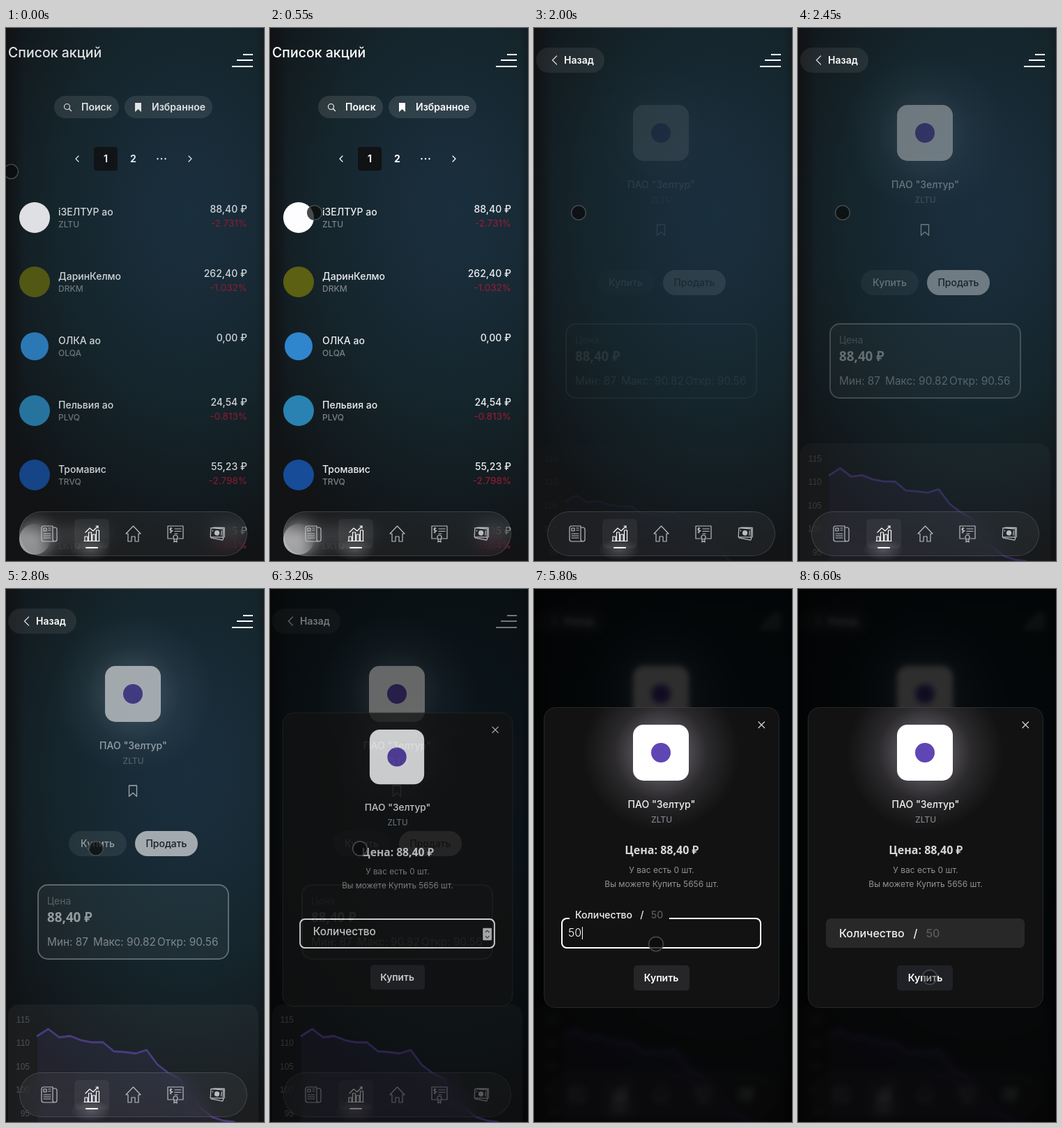
Recreate the animation shown at these times as an HTML page. Size 370 by 762 pixels, loop 8 s.

```html
<!DOCTYPE html>
<html lang="ru">
<head>
<meta charset="utf-8">
<title>Акции</title>
<style>
html, body { margin: 0; width: 100%; height: 100%; overflow: hidden; background: #0f1113; }
#stage { position: relative; width: 370px; height: 762px; overflow: hidden; }
#page, #page > *, #stage > svg, #shade { position: absolute; left: 0; top: 0; width: 370px; height: 762px; }
#page { background:
  linear-gradient(90deg, #101214 0, #10121400 7%, #10121400 97%, #10121455 100%),
  radial-gradient(ellipse 345px 500px at 262px 262px, #1a2f3e 0, #182b37 25%, #15252c 55%, #121b1f 82%, #111315 100%); }
#page #nav { left: 19px; top: 691px; width: 325px; height: 62px; border: 1px solid #ffffff22; border-radius: 32px;
  background: #ffffff0d; backdrop-filter: blur(13px); }
#shade { background: #000; }
text { white-space: pre; }
.line { fill: none; stroke-linecap: round; stroke-linejoin: round; }
</style>
</head>
<body>
<div id="stage">
  <div id="page">
    <svg id="back"></svg>
    <div id="nav"></div>
    <svg id="icons"></svg>
  </div>
  <div id="shade"></div>
  <svg id="front"></svg>
</div>
<script>
const $ = id => document.getElementById(id);
const clamp = v => Math.max(0, Math.min(1, v));
const span = (t, a, b) => clamp((t - a) / (b - a));
const mix = (a, b, p) => a + (b - a) * p;
const easeOut = p => 1 - (1 - p) ** 2;
const easeInOut = p => p * p * (3 - 2 * p);

// Text whose capitals are centred on cy
const text = (x, cy, str, { size = 14, weight = 500, fill = '#eceef0', anchor = 'start', font = 'Inter', id = '' } = {}) =>
  `<text ${id && `id="${id}"`} x="${x}" y="${cy + size * .34}" font-family="${font}, sans-serif" font-size="${size}"
    font-weight="${weight}" fill="${fill}" text-anchor="${anchor}">${str}</text>`;
const rect = (x, y, w, h, r, fill, more = '') =>
  `<rect x="${x}" y="${y}" width="${w}" height="${h}" rx="${r}" fill="${fill}" ${more}/>`;
const line = (d, stroke = '#fff', width = 1.2, more = '') =>
  `<path class="line" d="${d}" stroke="${stroke}" stroke-width="${width}" ${more}/>`;
const halo = (id, color, strength) => `<radialGradient id="${id}">
  <stop offset=".3" stop-color="${color}" stop-opacity="${strength}"/>
  <stop offset=".6" stop-color="${color}" stop-opacity="${strength * .36}"/>
  <stop offset="1" stop-color="${color}" stop-opacity="0"/></radialGradient>`;
const middle = { anchor: 'middle' };
const strong = { weight: 600, fill: '#fff' };
const ticker = { size: 12, weight: 500, fill: '#7b8287' };
const bold = { font: "'Open Sans'", weight: 700 };

const company = 'ПАО "Зелтур"', code = 'ZLTU', price = '88,40 ₽';
const stocks = [
  ['iЗЕЛТУР ао', code, price, '-2.731%', '#fdfdff'],
  ['ДаринКелмо', 'DRKM', '262,40 ₽', '-1.032%', '#5c6012'],
  ['ОЛКА ао', 'OLQA', '0,00 ₽', '', '#2f86cc'],
  ['Пельвия ао', 'PLVQ', '24,54 ₽', '-0.813%', '#2a82b2'],
  ['Тромавис', 'TRVQ', '55,23 ₽', '-2.798%', '#164c98'],
  ['Ликтум ао', 'LKTQ', '71,05 ₽', '-1.604%', '#b4b4b6'],
];

const row = ([name, tick, cost, change, color], i) => {
  const y = 271 + 92 * i;
  return `<circle cx="41" cy="${y}" r="${i == 2 ? 20 : 22}" fill="${color}"/>`
    + text(75, y - 8, name) + text(75, y + 10, tick, ticker)
    + text(346, y - 12, cost, { anchor: 'end' })
    + text(346, y + 8, change, { anchor: 'end', size: 13.5, weight: 400, fill: '#a01a33' });
};

const list = `<g id="list">
  ${text(3, 35, 'Список акций', { size: 19.5, weight: 450, fill: '#fff' })}
  ${rect(69, 97, 93, 32, 16, '#ffffff1c')}${rect(170, 97, 126, 32, 16, '#ffffff1c')}
  <circle cx="87.5" cy="112.5" r="4" fill="none" stroke="#fff" stroke-width="1.1"/>${line('M90.5 115.5l3 3')}
  ${text(108, 113, 'Поиск', strong)}${text(209, 113, 'Избранное', strong)}
  <path d="M185 107h9v13l-4.500-4-4.500 4z" fill="#fff"/>
  ${line('M104 183l-4 4 4 4M262 183l4 4-4 4')}
  ${rect(126, 170, 34, 34, 4, '#111213')}
  ${text(143, 187, '1', { ...strong, ...middle, weight: 700 })}${text(182.5, 187, '2', { ...strong, ...middle, weight: 700 })}
  ${[217.5, 223, 228.5].map(x => `<circle cx="${x}" cy="187" r="1.200" fill="#fff"/>`).join('')}
  ${rect(2, 237, 361, 70, 14, '#ffffff0d', 'id="hover"')}
  ${stocks.map(row).join('')}
</g>`;

const ring = `<g id="ring">
  <defs><linearGradient id="hue" x2="0" y2="1">
    <stop offset=".15" stop-color="#8450d2"/><stop offset=".5" stop-color="#6a6ad4"/><stop offset=".85" stop-color="#2596d2"/>
  </linearGradient></defs>
  <circle cx="182" cy="350" r="33" fill="none" stroke="#bfc4cc" stroke-width="10" opacity=".5" style="filter:blur(6px)"/>
  <circle cx="182" cy="342" r="33" fill="none" stroke="url(#hue)" stroke-width="18" opacity=".7" style="filter:blur(7px)"/>
  <circle cx="182" cy="342" r="36" fill="url(#hue)" style="filter:blur(2px)"/>
  <circle cx="182" cy="342" r="26" fill="#101214" style="filter:blur(3px)"/>
</g>`;

const detail = `<g id="detail">
  <defs>${halo('mist', '#9db4c8', .32)}</defs>
  <circle cx="182" cy="150" r="115" fill="url(#mist)"/>
  ${rect(142, 110, 80, 80, 15, '#fff')}
  <circle cx="182" cy="150" r="14" fill="#5f46b4"/>
  ${text(182.5, 224, company, middle)}${text(182.5, 246, code, { ...ticker, ...middle })}
  ${line('M176.500 281h11v15.500l-5.500-5-5.500 5z', '#fff', 1.3)}
  ${rect(90, 346, 83, 36, 18, '#ffffff20')}${text(131.5, 364, 'Купить', middle)}
  ${rect(185, 346, 90, 36, 18, '#fff')}${text(230, 364, 'Продать', { ...middle, fill: '#15181b' })}
  ${rect(46, 423, 273, 106, 14, '#ffffff12', 'stroke="#ffffff80" stroke-width="2"')}
  ${text(59, 446, 'Цена', { fill: '#8a9094', weight: 400 })}
  ${text(59, 470, price, { ...bold, size: 18.8 })}
  ${[[59, 'Мин: 87'], [125, 'Макс: 90.82'], [217, 'Откр: 90.56']]
    .map(([x, s]) => text(x, 505, s, { size: 15.4, weight: 400, fill: '#c3c8cc' })).join('')}
  ${rect(3, 594, 359, 300, 15, '#ffffff12')}
  <path id="area" fill="#6a60b82e"/>
  <path id="curve" class="line" stroke="#7054c0" stroke-width="2.800"/>
  ${[115, 110, 105, 100, 95].map((v, i) =>
    text(34, 615.5 + 33.6 * i, v, { size: 12, weight: 400, fill: '#74787c', anchor: 'end', font: "'Liberation Sans'" })).join('')}
</g>`;

$('back').innerHTML = list + ring + detail
  + `<g id="return">${rect(3, 28, 98, 36, 18, '#ffffff12')}${line('M32.500 40l-6 6 6 6', '#cfd3d6', 1.4)}
    ${text(43, 46, 'Назад', strong)}</g>`
  + line('M341 38h12M332 46h21M325 55h28', '#fff', 2, 'style="stroke-linecap:square"');

const soft = '#b9bdc0';
$('icons').innerHTML = `
  <defs><radialGradient id="glow"><stop stop-color="#fff" stop-opacity=".2"/><stop offset="1" stop-color="#fff" stop-opacity="0"/></radialGradient></defs>
  <ellipse cx="122" cy="746" rx="30" ry="16" fill="url(#glow)"/>
  ${rect(98, 702, 50, 42, 6, '#ffffff0e')}${rect(114, 742, 18, 2, 1, '#fff')}`
  + line('M54 712h13v19q0 3 3 3h-16q-3 0-3-3v-16q0-3 3-3zM67 714h3q3 0 3 3v14q0 3-3 3M54 715h4v4h-4zM61 715h3M61 718h3M54 723h10M54 726h10M54 729h10', soft)
  + line('M113 733v-6h4v6M118.500 733v-12h4v12M124 733v-9h4v9M129.500 733v-15h4v15M112 733.500h22M114 721l6-6 5 4 7-7M129 712h3v3', '#fff')
  + line('M172 723l10.500-11 10.500 11h-3v11h-5v-7h-5v7h-5v-11z', soft)
  + line('M239 730h-7v-18h22v18h-7M242 716h9M242 719.500h9M242 723h4M238 715.500q-3-1-3 1t3 2-3 2.500M236.500 714v8M241 731v4l2-1.500 2 1.500v-4', soft)
  + `<circle cx="243" cy="728" r="3" fill="none" stroke="${soft}" stroke-width="1.2"/>
  <g transform="rotate(8 303 722)">`
  + line('M293 716l18-1 1 12-18 2zM296 715l16-2 2 13M295 730l17 1 1-4', soft)
  + `<circle cx="302.500" cy="722" r="3.600" fill="${soft}"/>` + line('M296 719v1M309 718v6', soft) + '</g>';

const caption = { ...middle, size: 12, weight: 400, fill: '#929294' };
$('front').innerHTML = `
  <defs>${halo('light', '#d8cde0', .34)}
    <clipPath id="card">${rect(14, 169, 338, 430, 16, '#000')}</clipPath></defs>
  <g id="modal">
    ${rect(14.5, 169.5, 337, 429, 16, '#121212', 'stroke="#262728"')}
    <circle id="halo" cx="182" cy="234" r="112" fill="url(#light)" clip-path="url(#card)"/>
    ${rect(142, 194, 80, 80, 15, '#fff')}<circle cx="182" cy="234" r="14" fill="#5f46b4"/>
    ${line('M322 190l8.500 8.500M330.500 190l-8.500 8.500', '#d8d8d8')}
    ${text(183, 308, company, { ...middle, fill: '#f2f2f2' })}${text(183, 330, code, { ...ticker, ...middle })}
    ${text(183, 373.5, 'Цена: ' + price, { ...middle, ...bold, size: 16, fill: '#d8d8d8' })}
    ${text(183, 402, 'У вас есть 0 шт.', caption)}${text(183, 422, 'Вы можете Купить 5656 шт.', caption)}
    ${rect(40, 471, 285, 42, 7, '#121212', 'id="field" stroke="#fff" stroke-width="2"')}
    <g id="stepper">${rect(308, 484, 13, 18, 1, '#d0d0d0')}${line('M312 490l2.500-2.500 2.500 2.500M312 496l2.500 2.500 2.500-2.500', '#444')}</g>
    <rect id="notch" x="51" y="469" height="5" fill="#121212"/>
    <text id="label" x="59" font-family="Inter, sans-serif" font-weight="500" fill="#f2f2f2">Количество<tspan id="slash" dx=".8em">/</tspan><tspan id="count" dx=".75em" fill="#5a5a5a"></tspan></text>
    ${text(49, 492, '', { size: 16, weight: 300, fill: '#fff', id: 'value' })}
    <rect id="caret" y="483" width="1" height="18" fill="#fff"/>
    ${rect(143, 538, 80, 36, 5, '#262628', 'id="buy"')}${text(182.5, 556, 'Купить', { ...middle, ...strong })}
  </g>
  <circle id="cursor" r="10.300" fill="#0b0c0e" stroke="#464b4f" stroke-width="1.400"/>`;

const curveY = [639, 629, 641, 639, 645, 648, 648, 661, 662, 664, 659, 680, 692, 700, 722, 742, 755, 760, 762];
// Start, end, then the point reached
const moves = [[0, 550, 64, 264], [2630, 2800, 129, 371], [5130, 5150, 132, 362], [5280, 6050, 189, 555]];

const show = (id, opacity) => {
  $(id).style.opacity = opacity;
  $(id).style.display = opacity > 0 ? '' : 'none';
};
const set = (id, attrs) => { for (const k in attrs) $(id).setAttribute(k, attrs[k]); };

function drawCursor(t) {
  let x = 7, y = 205;
  for (const [a, b, toX, toY] of moves) {
    const p = a ? easeInOut(span(t, a, b)) : easeOut(span(t, a, b));
    x = mix(x, toX, p);
    y = mix(y, toY, p);
  }
  set('cursor', { cx: x, cy: y, 'fill-opacity': mix(.75, .4, span(t, 5900, 6100)) });
}

function drawChart(t) {
  const rise = 1 - (1 - span(t, 1650, 2650)) ** 4;
  const d = 'M' + curveY.map((y, i) => `${45 + i * 15.67} ${mix(850, y, rise)}`).join('L');
  set('curve', { d });
  set('area', { d: d + 'V850H45Z' });
}

function drawModal(t) {
  const u = span(t, 2920, 3450), p = easeOut(u);
  show('shade', .82 * mix(u, p, .5));
  const blur = 4 * span(t, 3220, 3450);
  $('page').style.filter = blur ? `blur(${blur}px)` : '';
  show('modal', p);
  show('halo', span(t, 3150, 3650));
  set('modal', { transform: `translate(183 ${384 + 13 * (1 - p)}) scale(${.9 + .1 * p}) translate(-183 -384)` });

  const leave = easeInOut(span(t, 6120, 6600));
  const float = easeInOut(span(t, 3080, 3650)) * (1 - leave);
  const typed = t < 4500 ? '' : t < 4650 ? '5' : '50';
  const size = mix(16, 14, float), gray = Math.round(mix(18, 40, leave));
  set('label', { y: mix(492, 466, float) + size * .36, 'font-size': size });
  $('slash').textContent = typed && '/';
  $('count').textContent = typed;
  set('field', { fill: `rgb(${gray},${gray},${gray})`, 'stroke-opacity': 1 - leave });
  const notchWidth = typed ? 125 + 9 * typed.length : 97;
  set('notch', { width: notchWidth, opacity: float > .8 && !leave ? 1 : 0 });
  show('stepper', t < 3450 ? 1 : 0);

  $('value').textContent = typed;
  show('value', 1 - leave);
  const caretOn = t >= 3650 && t < 4150 || t >= 4500 && t < 5150 || t >= 5650 && t < 6150;
  set('caret', { x: 49.5 + 9.7 * typed.length });
  show('caret', caretOn ? 1 : 0);
  const hover = span(t, 5950, 6300);
  set('buy', { x: 143 - hover, fill: hover > .5 ? '#202126' : '#262628' });
}

function draw(t) {
  const opened = t >= 1200;
  show('list', opened ? 0 : mix(.87, 1, easeOut(span(t, 0, 550))));
  show('hover', span(t, 700, 800));
  show('return', opened ? 1 : 0);
  show('ring', opened && t < 1650 ? 1 : 0);
  set('ring', { transform: `rotate(${(t - 1250) * .3} 182 342)` });
  show('detail', span(t, 1860, 3430));
  drawChart(t);
  drawModal(t);
  drawCursor(t);
}

const start = performance.now();
function tick() {
  draw((performance.now() - start) % 8000);
  requestAnimationFrame(tick);
}
tick();
</script>
</body>
</html>
```
